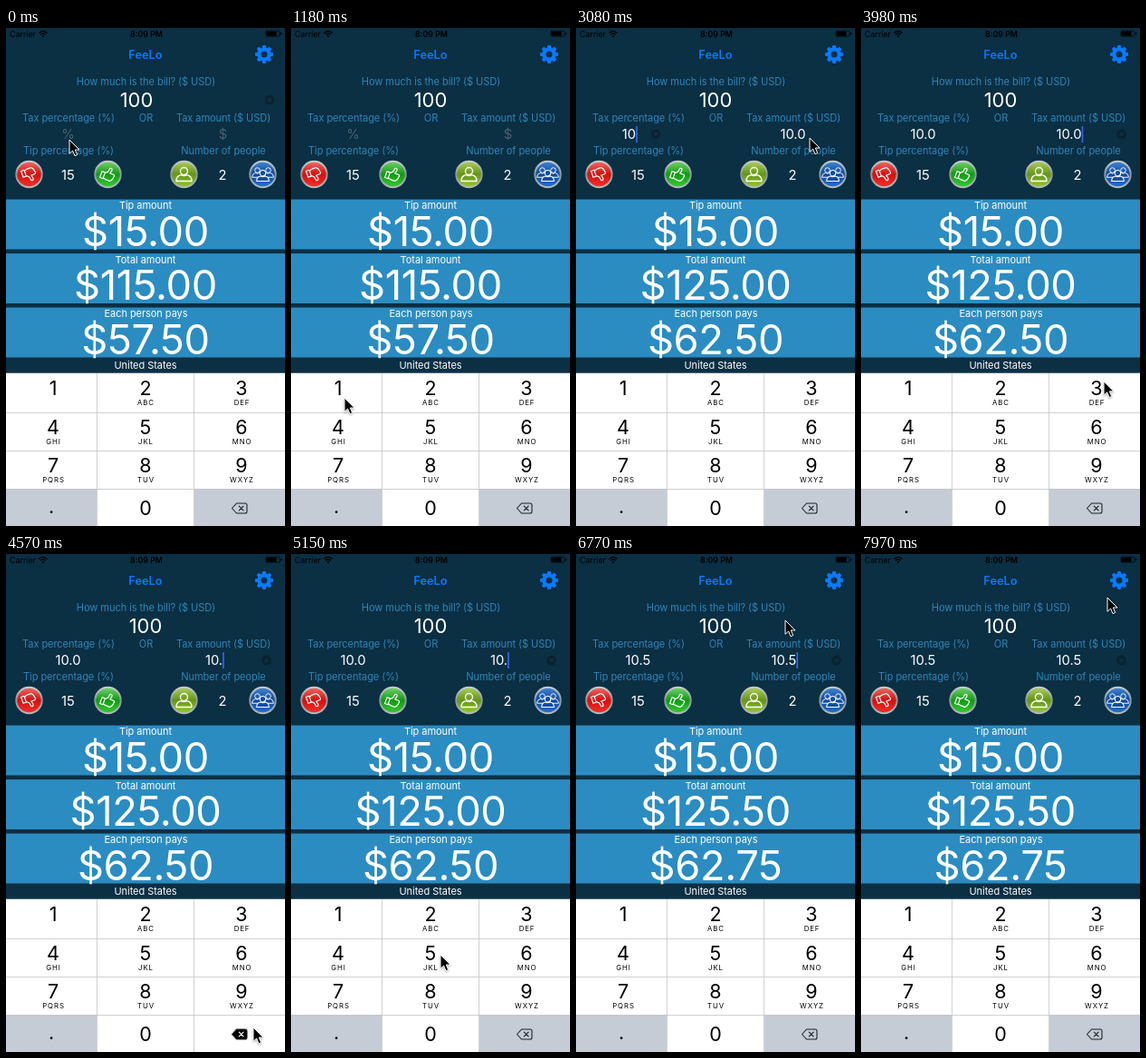
An HTML page that plays this animation: 308 by 548 pixels, repeating every 8000 ms.

```html
<!DOCTYPE html>
<html lang="en">
<head>
<meta charset="utf-8">
<title>Tip calculator</title>
<style>
  html, body { margin: 0; width: 100%; height: 100%; overflow: hidden; background: #0b2f43; }
  svg { display: block; width: 100%; height: 100%; }
  text { font-family: Inter, Roboto, sans-serif; text-anchor: middle; }
  .label { font-size: 11.05px; letter-spacing: -.07px; fill: #2f86b9; }
  .caption { font-size: 11px; letter-spacing: -.05px; fill: #fff; }
  .money { font-size: 45.3px; letter-spacing: -.4px; fill: #fff; }
  .bill { font-size: 22px; fill: #fff; }
  .value { font-size: 14.8px; fill: #fff; }
  .value.empty { fill: #4b6170; }
  .status { font-size: 8.8px; fill: #000; }
  .title { font-size: 12.8px; font-weight: 600; fill: #0a7aff; }
  .digit { font-size: 21.5px; fill: #000; }
  .letters { font-size: 7.8px; letter-spacing: .9px; fill: #000; }
  .line { fill: none; stroke: #fff; stroke-width: 1.3; stroke-linejoin: round; }
  #pointer { filter: drop-shadow(0 1px 1px rgba(0, 0, 0, .35)); }
</style>
</head>
<body>
<svg id="stage" viewBox="0 0 308 548" preserveAspectRatio="none">
  <defs>
    <linearGradient id="rim" x2="0" y2="1"><stop stop-color="#c9cfd1"/><stop offset=".5" stop-color="#8b9699"/><stop offset="1" stop-color="#b4bcbe"/></linearGradient>
    <linearGradient id="red" x2="0" y2="1"><stop stop-color="#ef6560"/><stop offset=".5" stop-color="#d60f0d"/><stop offset="1" stop-color="#f0302a"/></linearGradient>
    <linearGradient id="green" x2="0" y2="1"><stop stop-color="#6ccf63"/><stop offset=".5" stop-color="#129a14"/><stop offset="1" stop-color="#35c732"/></linearGradient>
    <linearGradient id="lime" x2="0" y2="1"><stop stop-color="#a8cb55"/><stop offset=".5" stop-color="#649516"/><stop offset="1" stop-color="#92c52d"/></linearGradient>
    <linearGradient id="blue" x2="0" y2="1"><stop stop-color="#3f82d2"/><stop offset=".5" stop-color="#0d479c"/><stop offset="1" stop-color="#2470cc"/></linearGradient>
    <path id="thumb" d="M-8 -1h4v8h-4zM-4 0L-1 -3L0 -8q3 -1 3 2l-1 4h5q2 1 .5 3q1 1.500 -.5 2.500q.5 1.500 -1 2.200q0 1.300 -2 1.300h-4l-4 -1z"/>
    <g id="bust"><circle cy="-3.500" r="4"/><path d="M-8.500 7.500q0 -6 5.500 -6.800q3 1.800 6 0q5.500 .8 5.500 6.800z"/></g>
    <g id="clear"><circle r="5.300" fill="#092330"/><path d="M-1.900 -1.900l3.800 3.800m0 -3.800l-3.800 3.800" stroke="#123a50"/></g>
  </defs>
  <rect width="308" height="548" fill="#0b2f43"/>
  <g id="gear" transform="translate(285 29)" fill="#0a7aff"></g>
  <g transform="translate(41 9.300)" fill="none" stroke="#000" stroke-width="1.200">
    <path d="M-4.500 -3.800q4.500 -4 9 0M-2.800 -2q2.800 -2.500 5.600 0"/><circle cy="-.3" r=".5"/>
  </g>
  <rect x="287" y="3.200" width="15" height="6" rx="1.300" fill="none" stroke="#000" stroke-width=".7"/>
  <rect x="287.500" y="3.700" width="11" height="5"/>
  <rect x="303" y="5" width="1.200" height="2.400" rx=".6"/>
  <g id="buttons"></g>
  <g fill="#2b8cc1"><rect y="188.600" width="308" height="54.900"/><rect y="248.100" width="308" height="54.900"/><rect y="307.600" width="308" height="54.900"/></g>
  <rect y="379.700" width="308" height="168.300" fill="#fff"/>
  <g fill="#c6ccd6"><rect y="507" width="100" height="41"/><rect id="deleteKey" x="208" y="507" width="100" height="41"/>
    <rect id="zeroKey" x="101" y="507" width="106" height="41"/></g>
  <path d="M0 423.500h308M0 465.500h308M0 507.500h308M100.500 380v168M207.500 380v168" stroke="#c3c6ca" stroke-width=".8"/>
  <g id="labels"></g>
  <g transform="translate(258 528.500)" stroke-linejoin="round" stroke-linecap="round">
    <path id="deleteShape" d="M-8.500 0L-3.500 -5.500H6q2 0 2 2V3.500q0 2 -2 2H-3.500z" stroke="#1c2126" stroke-width="1.100"/>
    <path id="deleteCross" d="M-.7 -2.400l4.800 4.800m0 -4.800l-4.800 4.800" stroke-width="1.200"/>
  </g>
  <use id="clearButton" href="#clear"/>
  <rect id="caret" y="108" width="1.700" height="18" fill="#2f69e6"/>
  <path id="pointer" d="M0 0V15.300L3.600 12L6 17.700L8.700 16.500L6.300 11H11z" stroke="#fff" stroke-width="1" stroke-linejoin="round"/>
</svg>
<script>
const LOOP = 8000, STEP = 147.4;
const byId = id => document.getElementById(id);

function add(parent, tag, attrs, content = '') {
  const node = document.createElementNS('http://www.w3.org/2000/svg', tag);
  for (const key in attrs) node.setAttribute(key, attrs[key]);
  node.textContent = content;
  return byId(parent).appendChild(node);
}

// Place text so that its capitals are centred on y.
function write(kind, content, x, y) {
  const node = add('labels', 'text', { class: kind, x }, content);
  node.setAttribute('y', y + parseFloat(getComputedStyle(node).fontSize) * .364);
  return node;
}

write('status', 'Carrier', 18.5, 6.3);
write('status', '8:09 PM', 155, 6.3).setAttribute('font-weight', 600);
write('title', 'FeeLo', 154, 29.7);
write('label', 'How much is the bill? ($ USD)', 154.5, 59);
write('label', 'Tax percentage (%)', 69, 99.3);
write('label', 'OR', 154.5, 99.3);
write('label', 'Tax amount ($ USD)', 240, 99.3);
write('label', 'Tip percentage (%)', 69, 135.3);
write('label', 'Number of people', 240, 135.3);
write('value', '15', 68.5, 161.8);
write('value', '2', 239, 161.8);
write('caption', 'Tip amount', 154, 195.3);
write('caption', 'Total amount', 154, 254.8);
write('caption', 'Each person pays', 154.5, 314.3);
write('caption', 'United States', 154, 371);
write('money', '$15.00', 154, 223.3);
const bill = write('bill', '100', 154, 79.2);
const percent = write('value', '%', 68.5, 117);
const amount = write('value', '$', 239.5, 117);
const total = write('money', '', 154, 282.8);
const share = write('money', '', 154, 342.3);

const columns = [52, 154, 260];
['', 'ABC', 'DEF', 'GHI', 'JKL', 'MNO', 'PQRS', 'TUV', 'WXYZ'].forEach((letters, i) => {
  const x = columns[i % 3], y = 396.2 + 42.5 * Math.floor(i / 3);
  write('digit', i + 1, x, y);
  write('letters', letters, x + .5, y + 16);
});
write('digit', '.', 50, 526.5);
write('digit', '0', 154, 528.5);

for (let i = 0; i < 8; i++)
  add('gear', 'rect', { x: -2, y: -10, width: 4, height: 5, rx: 1, transform: `rotate(${i * 45})` });
add('gear', 'circle', { r: 5.6, fill: 'none', stroke: '#0a7aff', 'stroke-width': 4.2 });

function button(x, color) {
  add('buttons', 'circle', { cx: x, cy: 161, r: 15.2, fill: 'url(#rim)' });
  add('buttons', 'circle', { cx: x, cy: 161, r: 13.2, fill: `url(#${color})` });
}
function icon(shape, x, y, transform = '', fill = 'none') {
  const node = add('buttons', 'use', { href: '#' + shape, class: 'line', transform: `translate(${x} ${y}) ${transform}` });
  node.style.fill = fill;
}
button(25.5, 'red');
icon('thumb', 25.5, 161, 'rotate(-20) scale(.9 -.9)');
button(112.5, 'green');
icon('thumb', 112.5, 161, 'rotate(20) scale(.9)');
button(196.5, 'lime');
icon('bust', 196.5, 161);
button(283.5, 'blue');
icon('bust', 277.5, 159, 'scale(.7)');
icon('bust', 289.5, 159, 'scale(.7)');
icon('bust', 283.5, 162.5, 'scale(.8)', '#0f4ca6');

const path = [
  [0, 70, 123], [147, 70, 122.5], [500, 70, 122.5], [1150, 59, 407], [1330, 59, 407],
  [1620, 142, 517], [1769, 145, 532], [2063, 145, 532], [2800, 254, 125], [3090, 258, 121],
  [3500, 258, 121], [4280, 273, 521], [4620, 273, 521], [5159, 165, 441], [5750, 165, 441],
  [5900, 160, 434], [6780, 231, 73], [7520, 268, 51], [7800, 268, 51], [7950, 272, 48], [LOOP, 272, 48]
];
function pointerAt(t) {
  const i = Math.max(1, path.findIndex(p => p[0] > t));
  const [t0, x0, y0] = path[i - 1], [t1, x1, y1] = path[i];
  const k = (t - t0) / (t1 - t0), ease = k * k * (3 - 2 * k);
  return [x0 + (x1 - x0) * ease, y0 + (y1 - y0) * ease];
}

// start, percent, amount, total, share, focused field
const states = [
  [0, '', '', '$115.00', '$57.50', 'bill'],
  [580, '', '', '$115.00', '$57.50', 'percent'],
  [1320, '1', '1.0', '$116.00', '$58.00', 'percent'],
  [1760, '10', '10.0', '$125.00', '$62.50', 'percent'],
  [3530, '10.0', '10.0', '$125.00', '$62.50', 'amount'],
  [4560, '10.0', '10.', '$125.00', '$62.50', 'amount'],
  [5290, '10.5', '10.5', '$125.50', '$62.75', 'amount']
];

// Solid for a while after each edit, then blinking.
function caretOn(age) {
  return age < 700 || (age - 700) % 960 >= 480;
}

function show(node, visible) { node.style.display = visible ? '' : 'none'; }

function field(node, content, placeholder, center, focused) {
  node.textContent = content || placeholder;
  node.classList.toggle('empty', !content);
  node.setAttribute('x', focused && content ? center - 10 : center);
}

function draw(t) {
  const [start, rate, tax, sum, each, focus] = states.findLast(s => s[0] <= t);
  field(percent, rate, '%', 68.5, focus === 'percent');
  field(amount, tax, '$', 239.5, focus === 'amount');
  bill.setAttribute('x', focus === 'bill' ? 144 : 154);
  total.textContent = sum;
  share.textContent = each;

  const active = focus === 'amount' ? amount : percent;
  const typed = focus === 'amount' ? tax : rate;
  const end = +active.getAttribute('x') + (typed ? active.getComputedTextLength() / 2 : 0);
  byId('caret').setAttribute('x', end);
  show(byId('caret'), focus !== 'bill' && (typed ? caretOn(t - start) : t - start < 500));

  const clearAt = { bill: [291, 79], percent: [88, 117], amount: [287.5, 117] }[focus];
  byId('clearButton').setAttribute('transform', `translate(${clearAt})`);
  show(byId('clearButton'), focus === 'bill' || typed);

  const deleting = t > 4560 && t < 4700;
  byId('deleteKey').setAttribute('fill', deleting ? '#fff' : '#c6ccd6');
  byId('deleteShape').setAttribute('fill', deleting ? '#000' : 'none');
  byId('deleteCross').setAttribute('stroke', deleting ? '#fff' : '#1c2126');
  show(byId('zeroKey'), t > 1760 && t < 1900);
  byId('pointer').setAttribute('transform', `translate(${pointerAt(t)})`);
}

function tick(now) {
  draw(Math.floor((now % LOOP + 20) / STEP) * STEP);
  requestAnimationFrame(tick);
}
draw(0);
requestAnimationFrame(tick);
</script>
</body>
</html>
```
